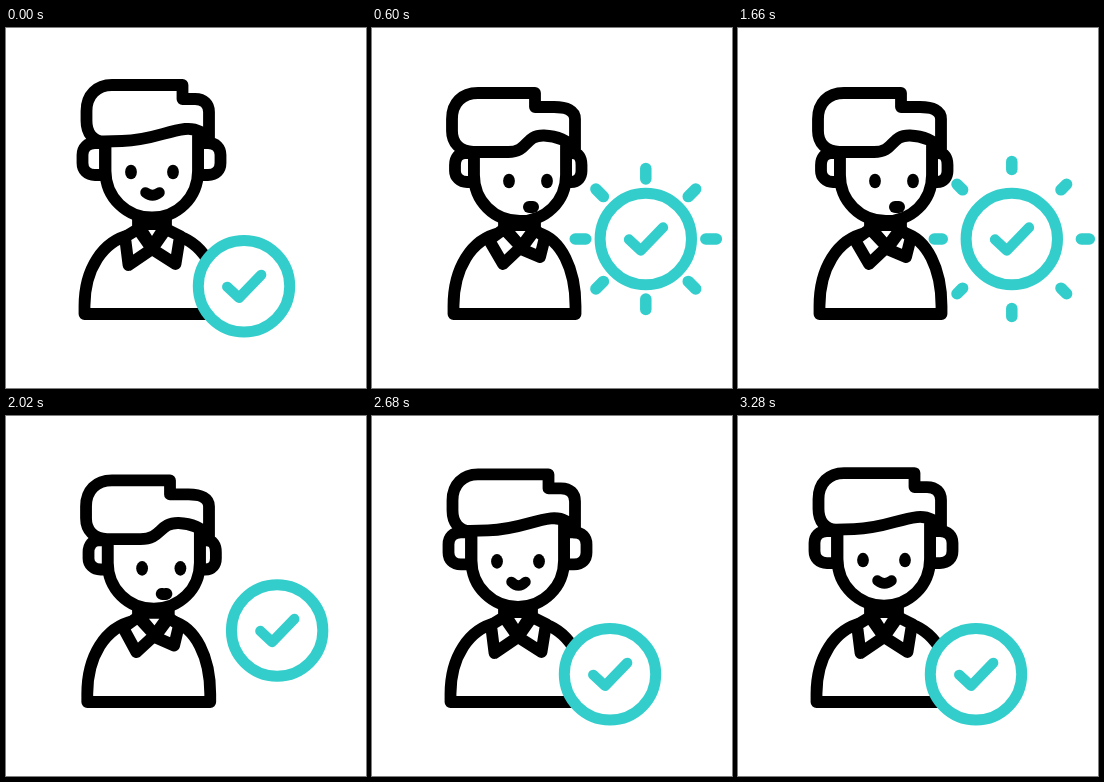
These frames come from a looping animation (360x360 px, 3300 ms). An HTML page:

```html
<!DOCTYPE html>
<html lang="en">
<head>
<meta charset="utf-8">
<title>Approved user</title>
<style>
html, body { margin: 0; width: 100%; height: 100%; overflow: hidden; background: #fff; }
svg { display: block; width: 100vw; height: 100vh; }
</style>
</head>
<body>
<svg viewBox="0 0 360 360" stroke-linecap="round" stroke-linejoin="round">
  <g id="person" fill="#fff" stroke="#000" stroke-width="11.8"></g>
  <g id="badge" fill="none" stroke="#33cecb">
    <g id="rays" stroke-width="11.5"></g>
    <circle r="45.7" fill="#fff" stroke-width="11"/>
    <path d="M-16.8 .5L-5 11.5L17.2 -11.5" stroke-width="10.3"/>
  </g>
</svg>
<script>
const LOOP = 3300;
const NS = "http://www.w3.org/2000/svg";
const $ = id => document.getElementById(id);

function add(parent, tag, attrs = {}) {
  const el = document.createElementNS(NS, tag);
  for (const k in attrs) el.setAttribute(k, attrs[k]);
  return parent.appendChild(el);
}

const clamp = x => Math.max(0, Math.min(1, x));
const lerp = (a, b, p) => a + (b - a) * p;
const span = (t, start, length) => clamp((t - start) / length);
const ease = x => x < .5 ? 4 * x ** 3 : 1 - 4 * (1 - x) ** 3;

// Blend two path strings that share the same commands.
function mix(a, b, p) {
  const to = b.match(/-?[\d.]+/g);
  let i = 0;
  return a.replace(/-?[\d.]+/g, n => lerp(+n, +to[i++], p).toFixed(2));
}

const person = $("person");
const torso = add(person, "g");
const head = add(person, "g");
const shapes = [];

function shape(parent, front, side, attrs) {
  shapes.push([add(parent, "path", attrs), front, side]);
}

// body, neck, collar
shape(torso,
  "M78.5 286L78.5 278C78.5 241 97 213 124 207L168 207C195 213 213.5 241 213.5 278L213.5 286Z",
  "M81.5 286L81.5 278C81.5 241 99 211 128 205L166 205C189 211 203.5 241 203.5 278L203.5 286Z");
shape(torso,
  "M132 190L132 197L146 219L160 197L160 190M132 196L160 196",
  "M132 190L132 199L149 219L163 200L163 192M132 197L163 197");
shape(torso,
  "M132 201L119 209L122.5 237L146 221Z",
  "M132 201L117 212L131 236L149 219Z");
shape(torso,
  "M160 201L174 208L169.5 236L146 221Z",
  "M163 202L173 209L168 229L149 221Z");

// ears, face, hair
shape(head,
  "M99 147L89 147C81 147 76.5 142 76.5 135L76.5 127C76.5 120 81 115 89 115L99 115Z",
  "M102 154L95 154C88 154 83 149 83 143L83 137C83 130 87 125 93 125L102 125Z");
shape(head,
  "M192 147L202 147C210 147 214.5 142 214.5 135L214.5 127C214.5 120 210 115 202 115L192 115Z",
  "M194 154L199 154C206 154 209.5 149 209.5 143L209.5 137C209.5 130 207 125 200 125L194 125Z");
shape(head,
  "M99.5 113L99.5 143C99.5 170 121 189.5 146 189.5C171 189.5 192 170 192 143L192 108",
  "M102 122L102 147C102 173 122 193 148 193C173 193 194 174 194 147L194 118");
shape(head,
  "M80.5 93L80.5 83C80.5 67 91 57 106 57L176.5 57L176.5 71L189 71C198 71 203 76 203 84L203 115C199 104 190 100 179 101C160 103 146 112 116 113L98 113.5C87 113.5 80.5 105 80.5 93Z",
  "M80 103L80 91C80 75 90 65 106 65L163 65L163 79L182 79C195 79 203 83 203 91L203 121C195 112 184 108 172 107.5C152 107 157 124 136 124L101 124C88 123 80 115 80 103Z");

const eyes = [0, 1].map(() => add(head, "ellipse", { rx: 5.9, ry: 7.3, fill: "#000", stroke: "none" }));
const mouth = add(head, "path", { fill: "none" });

const rays = [...Array(8).keys()].map(i =>
  add($("rays"), "line", { transform: `rotate(${i * 45})`, y1: 0, y2: 0 }));

function drawRays(t) {
  const start = t < 1100 ? 420 : 1220;
  const u = (t - start) / 600;
  const on = u > 0 && u < 1;
  $("rays").setAttribute("visibility", on ? "visible" : "hidden");
  if (!on) return;
  const inner = lerp(60, 77.5, clamp(u * 2 - 1) ** .8);
  const outer = lerp(60, 77.5, clamp(u * 2));
  for (const r of rays) {
    r.setAttribute("x1", inner);
    r.setAttribute("x2", outer);
  }
}

function draw(t) {
  const p = ease(span(t, 25, 400)) - ease(span(t, 1915, 400));
  const nod = Math.sin(Math.PI * span(t, 2300, 990));

  for (const [el, front, side] of shapes) el.setAttribute("d", mix(front, side, p));
  head.setAttribute("transform", `translate(0 ${1.5 * nod})`);

  eyes.forEach((e, i) => {
    e.setAttribute("cx", lerp(125 + 42 * i, 137 + 38 * i, p));
    e.setAttribute("cy", lerp(144, 153, p));
  });
  mouth.setAttribute("d", mix(
    `M139.5 164.5Q146.5 ${170 + 2 * nod} 153.5 164.5`, "M157 179Q159 179 161 179", p));
  mouth.setAttribute("stroke-width", lerp(10.5, 12, p));

  $("badge").setAttribute("transform",
    `translate(${lerp(238, 273.8, p)} ${lerp(258.3, 211, p)})`);
  drawRays(t);
}

const begin = performance.now();
function tick() {
  draw((performance.now() - begin) % LOOP);
  requestAnimationFrame(tick);
}
draw(0);
requestAnimationFrame(tick);
</script>
</body>
</html>
```
